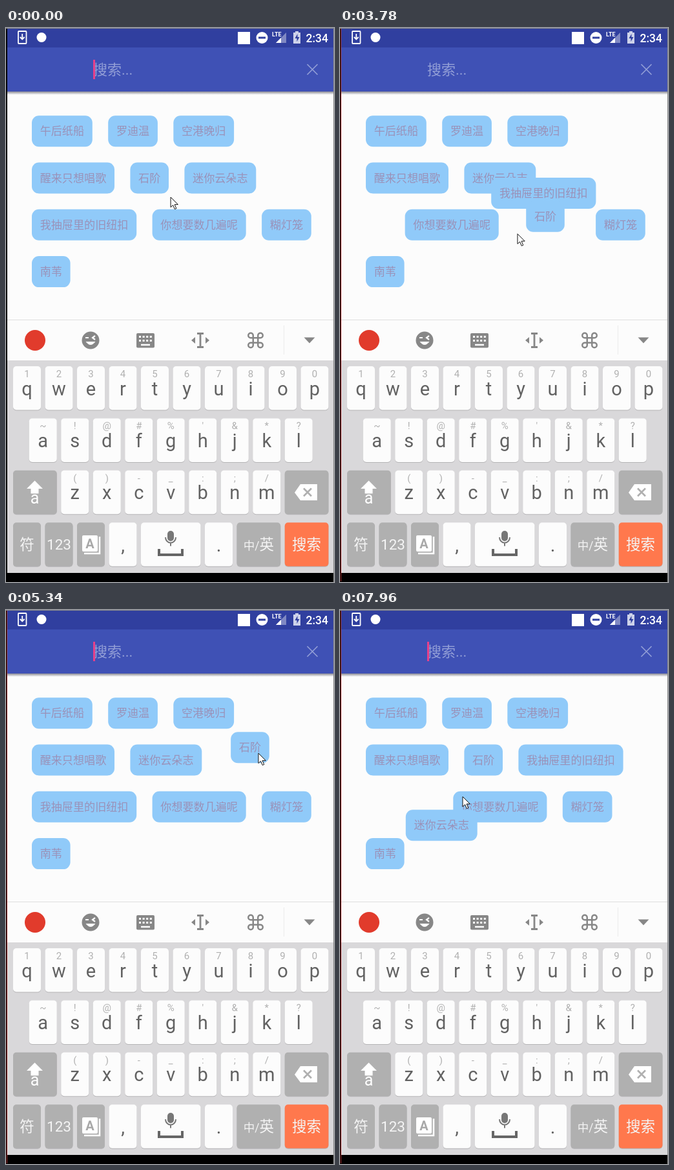
Animation, 508 px wide and 855 px high, one loop 8 s. Source, as an HTML page:

```html
<!DOCTYPE html>
<html lang="zh-CN">
<head>
<meta charset="utf-8">
<title>搜索</title>
<style>
html, body { margin: 0; width: 100%; height: 100%; overflow: hidden; background: #000; }
svg { display: block; width: 508px; height: 855px; }
text { font-family: Roboto, "Noto Sans CJK SC", "Noto Sans CJK", sans-serif; }
.mid { text-anchor: middle; }
.chip rect { fill: #90caf9; }
.chip text { font: 17.1px "Noto Sans CJK SC", "Noto Sans CJK", sans-serif; fill: #9a91b8; }
.letter { font-size: 29px; fill: #626262; }
.hint { font-size: 15px; fill: #b0b0b0; }
.label { font-size: 22.5px; fill: #f4f4f4; }
.white { fill: #fff; }
.icon { fill: #878787; }
.line { fill: none; stroke: #878787; }
</style>
</head>
<body>
<svg viewBox="0 0 508 855">
  <defs>
    <clipPath id="area"><rect x="39" y="100" width="446" height="350"/></clipPath>
    <linearGradient id="shade" x2="0" y2="1">
      <stop stop-color="#8a8a94"/><stop offset="1" stop-color="#fcfcfc"/>
    </linearGradient>
  </defs>

  <rect x="2" width="506" height="841" fill="#fcfcfc"/>
  <rect x="2" width="506" height="30" fill="#303f9f"/>
  <rect x="2" y="30" width="506" height="68" fill="#3f51b5"/>
  <rect x="2" y="98" width="506" height="5" fill="url(#shade)"/>

  <!-- status bar -->
  <g fill="none" stroke="#fff" stroke-width="1.8">
    <rect x="19" y="5" width="12.5" height="19" rx="1"/>
    <path d="M25.2 9v8M21.8 14l3.4 3.5 3.4-3.5"/>
  </g>
  <circle class="white" cx="55" cy="14.5" r="7.5"/>
  <rect class="white" x="359" y="6" width="19" height="19"/>
  <circle class="white" cx="396.5" cy="15" r="9"/>
  <path d="M391 15h11" stroke="#303f9f" stroke-width="3"/>
  <path d="M434 7v16h-16z" fill="#8089c3"/>
  <path class="white" d="M426 15v8h-8z"/>
  <text class="white" x="412" y="13" font-size="9" font-weight="700">LTE</text>
  <path d="M448 5h5v2h3v17h-11V7h3z" fill="#cdd2ea"/>
  <path d="M451.5 9l-4 7h3v5l4-7h-3z" fill="#303f9f"/>
  <text class="white" x="464.5" y="21.5" font-size="17.5" font-weight="500">2:34</text>

  <!-- search field -->
  <text x="135" y="72" font-size="22" fill="#929ed6">搜索...</text>
  <rect id="caret" x="135" y="49" width="3" height="30" fill="#e8408a"/>
  <path d="M466.5 56l16 16m0-16l-16 16" stroke="#929ed6" stroke-width="1.7"/>

  <g clip-path="url(#area)"><g id="chips"></g></g>

  <!-- keyboard toolbar -->
  <path d="M2 450.5h506" stroke="#dedede"/>
  <path d="M430.5 459v45" stroke="#ececec"/>
  <circle cx="45" cy="482" r="16" fill="#e13b2c"/>
  <circle class="icon" cx="131" cy="482" r="13.5"/>
  <g fill="none" stroke="#fcfcfc" stroke-width="2.2">
    <path d="M123 478h5M138 475l-4 3 4 3"/>
    <path d="M123.5 484q7.500 10 15 0z" fill="#fcfcfc" stroke="none"/>
  </g>
  <rect class="icon" x="202" y="471" width="28" height="22.5" rx="2"/>
  <path d="M206 476.5h20M206 482.5h20" stroke="#fcfcfc" stroke-width="3" stroke-dasharray="3 2.600"/>
  <path d="M209 489h14" stroke="#fcfcfc" stroke-width="2.5"/>
  <path class="line" d="M296 471.5h10M296 492.5h10M301 471.5v21" stroke-width="2.8"/>
  <path class="icon" d="M293 477v10l-6-5zM309 477v10l6-5z"/>
  <path class="line" transform="translate(371.500 467) scale(1.250)" stroke-width="2"
    d="M18 3a3 3 0 0 0-3 3v12a3 3 0 1 0 3-3H6a3 3 0 1 0 3 3V6a3 3 0 1 0-3 3h12a3 3 0 0 0 0-6z"/>
  <path class="icon" d="M461.5 477.5h17l-8.500 9z"/>

  <rect x="2" y="513" width="506" height="328" fill="#d9d8da"/>
  <g id="keys"></g>

  <!-- key symbols -->
  <path class="white" d="M44.5 698.5l12.500 12.500h-6.500v7.500h-12V711H32z"/>
  <text class="white mid" x="44.5" y="734" font-size="25">a</text>
  <path class="white" d="M447 717l9-13h26v25h-26z"/>
  <path d="M461 710.5l12 12m0-12l-12 12" stroke="#b0b0b0" stroke-width="2.6"/>
  <path d="M145 785v26h-24" fill="none" stroke="#fff" stroke-width="2.5"/>
  <rect class="white" x="118" y="783" width="24" height="25" rx="2"/>
  <text class="mid" x="130" y="803" font-size="20" font-weight="700" fill="#a9a9a9">A</text>
  <rect x="250" y="776" width="10" height="16" rx="5" fill="#777"/>
  <g fill="none" stroke="#777">
    <path d="M247 786a8 8.500 0 0 0 16 0M255 794.500v5" stroke-width="2"/>
    <path d="M237 804v9h36v-9" stroke="#666" stroke-width="4"/>
  </g>

  <rect y="841" width="508" height="14"/>
  <rect width="2" height="855"/>
  <path id="edge" d="M1.5 1v853" stroke="#9c2a2a"/>
  <path d="M0 .5h507.500V855" fill="none" stroke="#8b8b8b"/>
  <path id="pointer" d="M0 0v15.500l3.600-3.300 2.700 6.300 2.500-1.100-2.700-6.100h5.200z" fill="#fff" stroke="#111"/>
</svg>
<script>
const LOOP = 8000, SHIFT = 200, LAG = 60;
const NS = 'http://www.w3.org/2000/svg';
const $ = id => document.getElementById(id);

function add(parent, tag, attrs, label) {
  const node = document.createElementNS(NS, tag);
  for (const k in attrs) node.setAttribute(k, attrs[k]);
  if (label) node.textContent = label;
  return parent.appendChild(node);
}

// Keyboard: rows of keys measured in units of one letter key
const UNIT = 49.5, PALE = '#fcfcfc', GRAY = '#b0b0b0', ORANGE = '#ff784d';

function addRow(line, indent, keys) {
  const y = 522 + line * 80.4;
  let x = 11 + indent * UNIT;
  for (const { text, hint, span = 1, fill = PALE } of keys) {
    const width = span * UNIT - 6.5, mid = x + width / 2;
    const cls = fill === PALE ? 'letter' : 'label';
    add($('keys'), 'rect', { x, y: y + 1, width, height: 67.5, rx: 5, fill: '#b5b4b6' });
    add($('keys'), 'rect', { x, y, width, height: 67.5, rx: 5, fill });
    if (hint) add($('keys'), 'text', { x: mid, y: y + 17, class: 'hint mid' }, hint);
    if (text) add($('keys'), 'text', { x: mid, y: y + (cls === 'label' ? 42 : 44.5), class: cls + ' mid' }, text);
    x += span * UNIT;
  }
}
const letters = (row, hints) => [...row].map((text, i) => ({ text, hint: hints[i] }));
const gray = (text, span) => ({ text, span, fill: GRAY });

addRow(0, 0, letters('qwertyuiop', '1234567890'));
addRow(1, 0.5, letters('asdfghjkl', "~!@#%'&*?"));
addRow(2, 0, [gray('', 1.5), ...letters('zxcvbnm', '()-_:;/'), gray('', 1.5)]);
addRow(3, 0, [gray('符'), gray('123'), gray(''), { text: ',' }, { span: 2 }, { text: '.' },
  gray('中/英', 1.5), { text: '搜索', span: 1.5, fill: ORANGE }]);

const lang = [...document.querySelectorAll('.label')].find(n => n.textContent === '中/英');
lang.textContent = '';
add(lang, 'tspan', { 'font-size': 17.5 }, '中/');
add(lang, 'tspan', {}, '英');

// Chips
const labels = ['午后纸船', '罗迪温', '空港晚归', '醒来只想唱歌', '石阶', '迷你云朵志',
  '我抽屉里的旧纽扣', '你想要数几遍呢', '糊灯笼', '南苇'];
const widths = labels.map(s => s.length * 17.1 + 25.4);
const chips = labels.map((s, i) => {
  const g = add($('chips'), 'g', { class: 'chip' });
  add(g, 'rect', { width: widths[i], height: 48, rx: 11 });
  add(g, 'text', { x: 12.7, y: 30 }, s);
  return g;
});

// Flow layout: one slot per place in the order
function layout(order) {
  let x = 40, y = 135.2;
  return order.map(id => {
    if (x + widths[id] > 495) { x = 40; y += 72.3; }
    const slot = [x, y];
    x += widths[id] + 24.4;
    return slot;
  });
}

// Stops of the hand: time, x, y
const stops = [
  [0, 255, 261], [500, 282, 310], [890, 256, 271], [1170, 285, 242], [1880, 285, 242],
  [2050, 229, 240], [2600, 226, 239], [3005, 238, 238], [3090, 334, 245], [3270, 144, 334],
  [3640, 386, 271], [3800, 260, 324], [4680, 106, 248], [4940, 331, 209], [5340, 391, 221],
  [5940, 345, 241], [6200, 345, 241], [6620, 278, 221], [7250, 278, 221], [7390, 396, 235],
  [7680, 166, 324], [7880, 187, 333], [7960, 190, 288]
];

// A held chip trails the pointer; each swap is [time, new place]
const drags = [
  { chip: 4, from: 2660, to: 6200, grab: [34, 31], swaps: [[3120, 5], [3646, 7], [4500, 3], [4794, 5]] },
  { chip: 5, from: 7250, to: LOOP, grab: [86, 13], swaps: [[7420, 5], [7700, 6]] }
];
const swaps = drags.flatMap(d => d.swaps.map(([start, place]) => ({ start, place, chip: d.chip })));

const mix = (a, b, p) => a.map((v, i) => v + (b[i] - v) * p);

function hand(t) {
  const i = stops.findIndex(s => s[0] > t);
  if (i < 0) return stops[stops.length - 1].slice(1);
  const a = stops[i - 1], b = stops[i];
  return mix(a, b, (t - a[0]) / (b[0] - a[0])).slice(1);
}

// During a swap each chip slides to its neighbour's slot, then the flow is laid out afresh
function arrange(t) {
  let order = labels.map((_, i) => i);
  const spots = [];
  for (const { start, chip, place } of swaps) {
    if (t < start) break;
    const next = order.filter(id => id !== chip);
    next.splice(place, 0, chip);
    if (t < start + SHIFT) {
      const slots = layout(order), p = (t - start) / SHIFT;
      order.forEach((id, i) => spots[id] = mix(slots[i], slots[next.indexOf(id)], p));
      return { order, spots };
    }
    order = next;
  }
  layout(order).forEach((slot, i) => spots[order[i]] = slot);
  return { order, spots };
}

// The caret blinks every half second and pauses once while the first chip is pulled
function caretOn(t) {
  const phase = t < 3400 ? t - 20 : t + 600;
  return Math.floor(phase / 500) % 2 !== 0;
}

const move = (node, [x, y]) =>
  node.setAttribute('transform', `translate(${x.toFixed(2)} ${y.toFixed(2)})`);

let stack = '';
function draw(t) {
  const { order, spots } = arrange(t);
  const drag = drags.find(d => t >= d.from && t < d.to);
  let layers = order;
  if (drag) {
    spots[drag.chip] = hand(t - LAG).map((v, i) => v - drag.grab[i]);
    layers = [...order.filter(id => id !== drag.chip), drag.chip];
  }
  if (stack !== layers.join()) {
    stack = layers.join();
    layers.forEach(id => $('chips').append(chips[id]));
  }
  chips.forEach((g, id) => move(g, spots[id]));
  move($('pointer'), hand(t));
  $('caret').style.opacity = caretOn(t) ? 1 : 0;
  $('edge').style.opacity = t < 1000 ? 0 : 1;
}

const begin = performance.now();
function tick() {
  draw((performance.now() - begin) % LOOP);
  requestAnimationFrame(tick);
}
draw(0);
requestAnimationFrame(tick);
</script>
</body>
</html>
```
